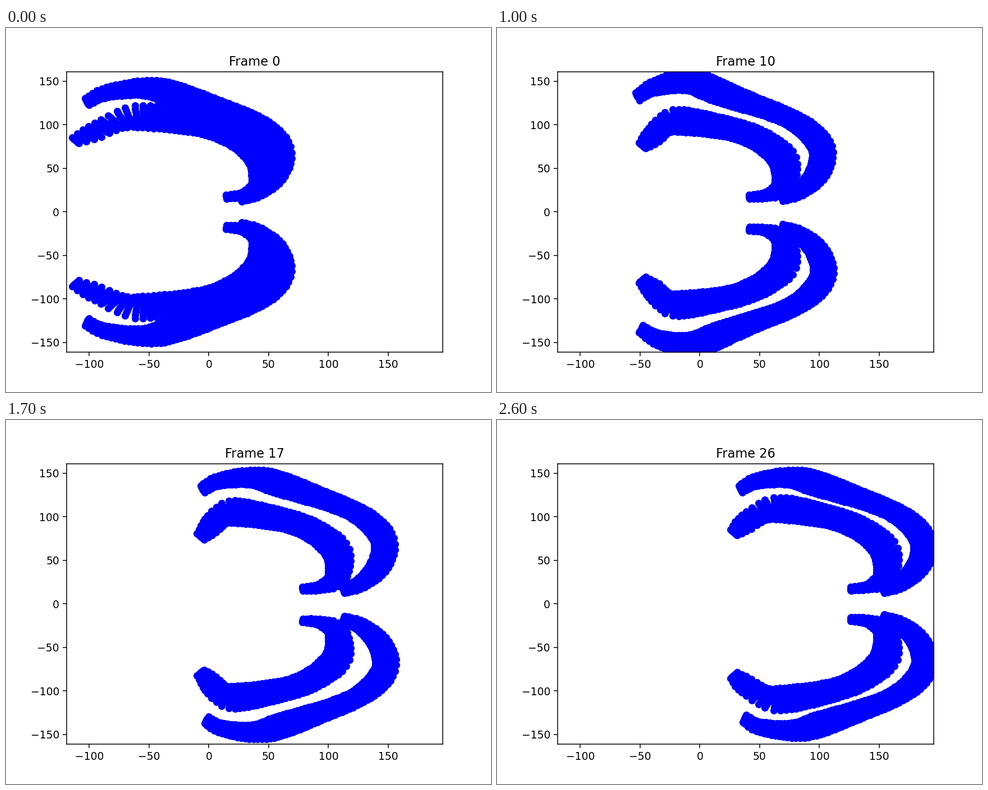
These frames come from a looping animation (864 px wide and 648 px high, 2700 ms). A matplotlib script:

```python
import numpy as np
import matplotlib.pyplot as plt
from matplotlib.animation import FuncAnimation

FRAMES, INTERVAL = 27, 100

# Midline from tail to head in stage pixels: x, y, half width.
SHELL = np.array([
    [327, 123, 7], [352, 109, 9], [411, 102, 13], [459, 112, 18],
    [551, 143, 13.5], [599, 163, 13.5], [636, 190, 17], [654, 222, 18.5],
    [643, 260, 16], [612, 290, 10], [581, 302, 6.5]])

CORE = np.array([
    [336, 209, 8], [350, 193, 15], [368, 171, 17], [394, 165, 20],
    [473, 178, 16], [515, 192, 17], [546, 210, 19], [572, 238, 22],
    [569, 280, 16], [540, 297, 6], [509, 300, 3.5]])


def bump(x, width):
    return np.exp(-(x / width) ** 2)


def step(x, width):
    return 1 / (1 + np.exp(-x / width))


def swim(frame):
    """Steady forward drift that sets in softly after a rest."""
    return np.logaddexp(0, frame - 5)


def spline(pts, t):
    """Catmull-Rom curve through the rows of pts."""
    p = np.vstack([2 * pts[0] - pts[1], pts, 2 * pts[-1] - pts[-2]])
    i = np.clip(t.astype(int), 0, len(pts) - 2)
    f = (t - i)[:, None]
    a, b, c, d = p[i], p[i + 1], p[i + 2], p[i + 3]
    return b + f / 2 * (c - a + f * (2 * a - 5 * b + 4 * c - d
                                     + f * (3 * (b - c) + d - a)))


def band(points, cols, rows):
    """Dots across a band: x, y, u along it (0 tail), side (1 outer)."""
    t = np.linspace(0, len(points) - 1, 600)
    x, y, half = spline(points, t).T
    length = np.r_[0, np.cumsum(np.hypot(np.diff(x), np.diff(y)))]
    length /= length[-1]
    tx, ty = np.gradient(x, length), np.gradient(y, length)
    norm = np.hypot(tx, ty)

    u = np.linspace(0, 1, cols)
    x, y, nx, ny = (np.interp(u, length, c)[:, None] for c in
                    (x, y, half * ty / norm, -half * tx / norm))
    side = np.linspace(1, -1, rows)
    grid = x + nx * side, y + ny * side
    return [*grid, *np.broadcast_arrays(u[:, None], side)]


SHELL_DOTS = band(SHELL, 72, 7)
CORE_DOTS = band(CORE, 54, 8)


def shell(frame):
    x, y, u, side = SHELL_DOTS
    x = x - 163 + 9.6 * swim(frame) + 68 * step(frame - 9.4, 1.4)
    x = x + 16 * bump(frame - 20.5, 3) * (1 - u)
    x = x - 20 * np.exp(-frame / 5 - 6 * u)
    y = y + 8 * np.exp(-frame / 2 - 3 * u)
    swell = 12 * bump(frame - 10.3, 2.5) * bump(u - .17, .12)
    return x, y - swell * (.67 + .33 * side), u


def core(frame):
    x, y, u, _ = CORE_DOTS
    opened = np.clip(max((10 - frame) / 6, (frame - 15) / 10), 0, 1)
    stretch = 62 * np.exp(-frame / 8) - 14 * bump(frame - 20.5, 3.5)
    x = x - 116 + 11.3 * swim(frame) - stretch * np.exp(-5 * u)
    x = x - 34 * opened * bump(u, .14)
    return x, y - 9 * opened * (1 - u), u


def to_data(x, y):
    return np.column_stack([(np.ravel(x) - 361.5) / 2.13,
                            (327.2 - np.ravel(y)) / 1.5515])


def body(frame):
    halves = []
    sag = 4 * bump(frame - 13, 6)
    for part, lead in ((shell, 7 * step(frame - 8, 1)), (core, 0)):
        x, y, u = part(frame)
        halves.append(to_data(x, y))
        halves.append(to_data(x + lead * (1 - u), y - sag) * [1, -1])
    return np.vstack(halves)


fig, ax = plt.subplots(figsize=(6.4, 4.8), dpi=135)
ax.set_xlim(-119, 195.4)
ax.set_ylim(-160.8, 160.8)
cloud = ax.scatter(*body(0).T, s=36, color="blue")
title = ax.set_title("Frame 0")


def update(frame):
    cloud.set_offsets(body(frame))
    title.set_text(f"Frame {frame}")
    return cloud, title


anim = FuncAnimation(fig, update, frames=FRAMES, interval=INTERVAL,
                     repeat=True, repeat_delay=0, blit=False)
plt.show()
```
